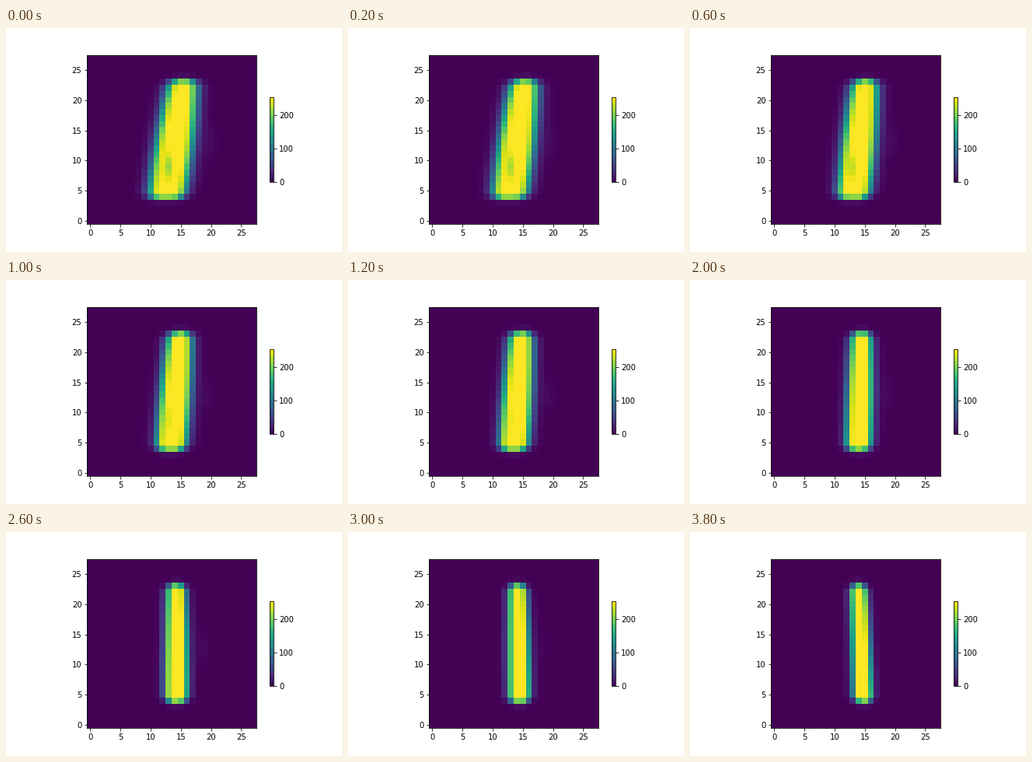
Write a matplotlib script that moves like this. It is 432 by 288 pixels and loops after 4200 ms.

```python
import numpy as np
import matplotlib.pyplot as plt
from matplotlib.animation import FuncAnimation

SIZE, STEPS, STEP_MS = 28, 21, 200
BOTTOM, TOP, VMAX = 4, 23, 253

plt.rcParams["figure.subplot.bottom"] = 0.125
plt.rcParams["font.size"] = 10

# Each stroke edge is a parabola over its height: middle column, slant, bend.
LEFT = np.array([[11.2, 1.8, 0.35], [13.0, -0.25, 0.0]])
RIGHT = np.array([[16.95, 1.1, -0.5], [15.75, -0.55, -0.1]])

rows, cols = np.mgrid[0:SIZE, 0:SIZE].astype(float)
height = (rows - (BOTTOM + TOP) / 2) / 10
cap = (rows == BOTTOM) | (rows == TOP)
halo = (rows == BOTTOM - 1) | (rows == TOP + 1)
inside = (rows >= BOTTOM) & (rows <= TOP)
weight = np.where(cap, 0.83, inside + 0.035 * halo)
inset = 0.45 * (cap | halo)


def sigmoid(x):
    return 1 / (1 + np.exp(-x))


def mix(start, end, t):
    return start + (end - start) * t


def blob(row, col, spread_r, spread_c):
    return np.exp(-((rows - row) / spread_r) ** 2 - ((cols - col) / spread_c) ** 2)


def edge(shape, t):
    middle, slant, bend = mix(shape[0], shape[1], t)
    return middle + slant * height + bend * height ** 2


def digit(step):
    p = min(1, step / (STEPS - 2))
    t = p * (1.5 - 0.5 * p)
    soft = mix(0.58, 0.34, t)
    body = sigmoid((cols - edge(LEFT, t) - inset) / soft)
    body *= sigmoid((edge(RIGHT, t) - inset - cols) / soft)
    body = np.minimum(1, 1.1 * body) * weight
    body *= 1 - 0.17 * max(0, 1 - 2 * t) * blob(9, 12.8, 1.8, 0.7)
    haze = 6 * (1 - p ** 4) * blob(13, mix(19.8, 17.8, p), 2.5, 1.2)
    return VMAX * body + haze


fig, ax = plt.subplots(figsize=(6, 4), dpi=72)
image = ax.imshow(digit(0), origin="lower", cmap="viridis", vmin=0, vmax=VMAX,
                  interpolation="nearest")
fig.colorbar(image, ax=ax, shrink=0.5)


def draw(step):
    image.set_data(digit(step))
    return [image]


anim = FuncAnimation(fig, draw, frames=STEPS, interval=STEP_MS,
                     repeat=True, repeat_delay=0)
plt.show()
```
